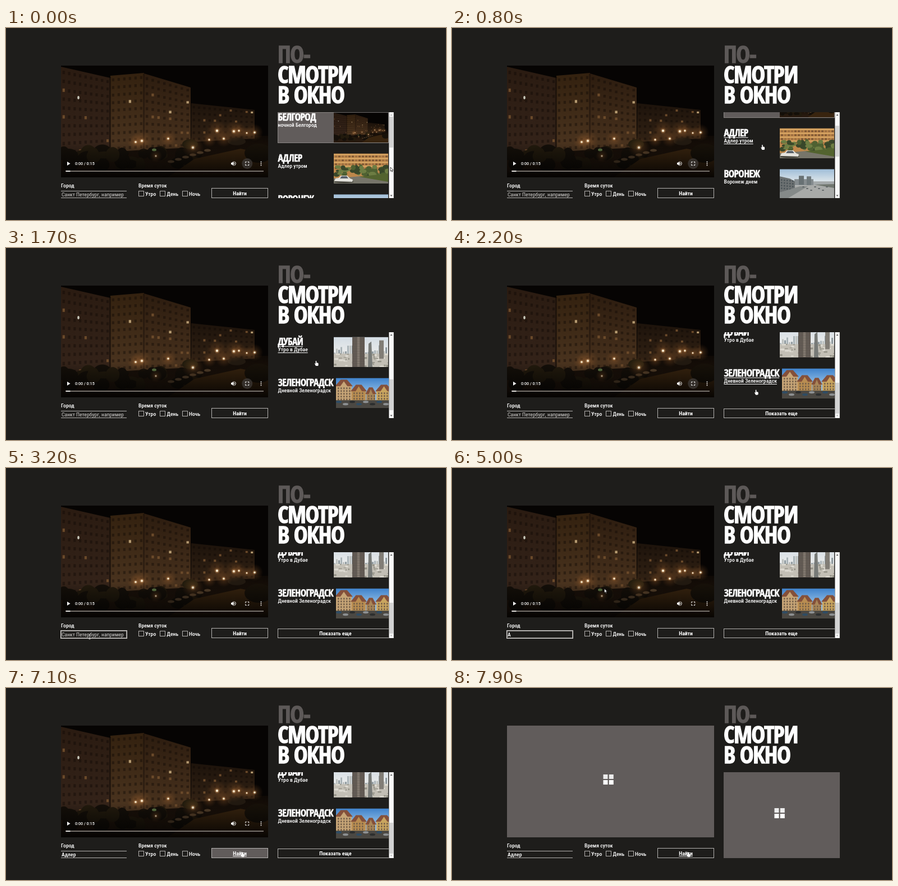
An HTML page with a canvas that plays this animation: 784x342 px, repeating every 8000 ms.

```html
<!DOCTYPE html>
<html lang="ru">
<head>
<meta charset="utf-8">
<title>Посмотри в окно</title>
<style>
html, body { margin: 0; width: 100%; height: 100%; overflow: hidden; background: #1e1d1b; }
canvas { display: block; width: 784px; height: 342px; }
</style>
</head>
<body>
<canvas id="stage"></canvas>
<script>
const W = 784, H = 342, LOOP = 8000, STEP = 100;
const BG = '#1e1d1b', GREY = '#615c5b', WHITE = '#fff', LINE = '#b4b2b0';
const canvas = document.getElementById('stage');
const ctx = canvas.getContext('2d');
const dpr = window.devicePixelRatio || 1;
canvas.width = W * dpr;
canvas.height = H * dpr;

// ---- type ----
const TIGHT = -.035, HEFT = .03; // tracking and extra weight of display type, in em
const face = (weight, stretch, family) => size => `${weight} ${stretch} ${size}px ${family}, sans-serif`;

function measure(font, sample) {
  ctx.font = font;
  return ctx.measureText(sample).width;
}

function narrowest(weight, families, sample) {
  return families
    .map(name => face(weight, 'extra-condensed', `"${name}"`))
    .sort((a, b) => measure(a(100), sample) - measure(b(100), sample))[0];
}

const sizeFor = (f, sample, width, max, tight = 0) =>
  Math.min(max, width / (measure(f(100), sample) / 100 + tight * sample.length));

const displayFace = narrowest(700, ['Noto Sans', 'Open Sans', 'Open Sans Condensed', 'Roboto Condensed'], 'СМОТРИ');
function display(sample, width, max) {
  const size = sizeFor(displayFace, sample, width, max, TIGHT);
  return { font: displayFace(size), tight: TIGHT * size, heft: HEFT * size };
}

const body = '"Roboto Condensed", Roboto';
const bodySize = sizeFor(face(400, 'condensed', body), 'Санкт Петербург, например', 111, 9.9);
const styles = {
  title: display('СМОТРИ', 132, 45),
  name: display('ЗЕЛЕНОГРАДСК', 103.5, 17.5),
  text: { font: face(400, 'condensed', body)(bodySize) },
  label: { font: face(500, 'condensed', body)(bodySize) },
  bold: { font: face(700, 'condensed', body)(bodySize) },
  time: { font: face(500, 'normal', 'Roboto')(7.2) }
};

function text(s, x, y, style, color = WHITE, { align = 'left', line = 0 } = {}) {
  const { font, tight = 0, heft = 0 } = styles[style];
  ctx.font = font;
  ctx.letterSpacing = `${tight}px`;
  ctx.textAlign = align;
  ctx.fillStyle = ctx.strokeStyle = color;
  ctx.fillText(s, x, y);
  if (heft) {
    ctx.lineWidth = heft;
    ctx.strokeText(s, x, y);
  }
  if (line) {
    const w = ctx.measureText(s).width;
    ctx.fillRect(align === 'center' ? x - w / 2 : x, y + line, w, 1);
  }
}

// ---- shapes ----
function rect(color, x, y, w, h) {
  ctx.fillStyle = color;
  ctx.fillRect(x, y, w, h);
}

function frame(color, x, y, w, h) {
  ctx.strokeStyle = color;
  ctx.lineWidth = 1;
  ctx.strokeRect(x + .5, y + .5, w - 1, h - 1);
}

function poly(color, ...p) {
  ctx.fillStyle = color;
  ctx.beginPath();
  for (let i = 0; i < p.length; i += 2) ctx.lineTo(p[i], p[i + 1]);
  ctx.closePath();
  ctx.fill();
}

function oval(color, x, y, rx, ry = rx) {
  ctx.fillStyle = color;
  ctx.beginPath();
  ctx.ellipse(x, y, rx, ry, 0, 0, 7);
  ctx.fill();
}

function fade(y0, y1, from, to) {
  const g = ctx.createLinearGradient(0, y0, 0, y1);
  g.addColorStop(0, from);
  g.addColorStop(1, to);
  return g;
}

function glow(x, y, r, color) {
  const g = ctx.createRadialGradient(x, y, 0, x, y, r);
  g.addColorStop(0, color);
  g.addColorStop(1, 'rgba(150,90,40,0)');
  rect(g, x - r, y - r, r * 2, r * 2);
}

// Draws a picture of its own size inside a clipped box.
function picture(draw, pw, ph, x, y, w, h) {
  ctx.save();
  ctx.beginPath();
  ctx.rect(x, y, w, h);
  ctx.clip();
  ctx.translate(x, y);
  ctx.scale(w / pw, h / ph);
  draw();
  ctx.restore();
}

function random(seed) {
  return () => (seed = (seed * 16807) % 2147483647) / 2147483647;
}

// ---- pictures ----
const mix = (a, b, k) => a + (b - a) * k;

function facade(x0, x1, top0, top1, bot0, bot1, dark, light, cols, rows, rnd) {
  poly(fade(Math.min(top0, top1), bot0, dark, light), x0, top0, x1, top1, x1, bot1, x0, bot0);
  const cw = (x1 - x0) / cols;
  for (let c = 0; c < cols; c++) {
    const k = (c + .5) / cols, top = mix(top0, top1, k), ch = (mix(bot0, bot1, k) - top) / rows;
    for (let r = 0; r < rows; r++) {
      const v = rnd();
      const tone = v > .985 ? '#b59a70' : v > .95 ? '#6b4a2a' : 'rgba(12,7,4,.38)';
      rect(tone, x0 + (c + .28) * cw, top + (r + .38) * ch, cw * .42, ch * .38);
    }
  }
}

function night() {
  const rnd = random(41);
  rect('#060403', 0, 0, 369, 199);
  rect(fade(125, 185, '#0e0905', '#27190e'), 0, 125, 369, 74);
  facade(0, 88, 2, 22, 162, 152, '#2a1b11', '#35241a', 9, 10, rnd);
  facade(88, 148, 18, 13, 154, 150, '#33210f', '#4c3520', 6, 10, rnd);
  facade(148, 231, 14, 39, 150, 146, '#2c1c0f', '#4a331e', 8, 10, rnd);
  facade(232, 345, 67, 79, 136, 130, '#1d130b', '#322214', 12, 6, rnd);
  rect('rgba(15,9,5,.5)', 86, 20, 3, 132);
  rect('rgba(15,9,5,.4)', 146, 14, 3, 136);
  for (let i = 0; i < 34; i++) {
    const x = rnd() * 240;
    oval(i % 3 ? '#140f09' : '#221a0d', x, 152 + rnd() * 26, 8 + rnd() * 12, 6 + rnd() * 9);
  }
  poly('#38240f', 238, 166, 320, 148, 369, 158, 369, 199, 190, 199);
  oval('#171109', 352, 156, 25, 17);
  oval('#211b0d', 230, 140, 14, 9);
  oval('#211910', 313, 135, 16, 7);
  for (let i = 0; i < 6; i++) oval('#54402b', 196 + i * 13, 171 - i * 4, 6, 2.4);
  const lamps = [[278, 116, 1], [308, 117, 1], [290, 130, .8], [264, 132, .7], [144, 134, 1],
    [133, 136, .8], [191, 130, .8], [235, 146, 1], [317, 116, .7], [331, 120, .6], [345, 119, .8], [169, 161, .6]];
  for (const [x, y, s] of lamps) {
    glow(x, y, 19 * s, 'rgba(190,120,60,.33)');
    glow(x, y, 5.5 * s, 'rgba(255,222,170,.95)');
    oval('#fff1d8', x, y, 2 * s);
  }
  oval('#c9cabb', 31, 57, 1.8, 3);
  oval('#5d7545', 166, 150, 4, 2.5);
}

function morning() {
  const rnd = random(7);
  rect('#bd874b', 0, 0, 97, 54);
  for (let y = 1; y < 28; y += 7) {
    rect('#d6a463', 0, y, 97, 2.5);
    for (let x = 2; x < 96; x += 6) rect(rnd() > .5 ? '#7d5634' : '#9b6d40', x, y + 3, 4, 3);
  }
  for (let i = 0; i < 60; i++) {
    oval(['#4f6132', '#6d7d43', '#39472a'][i % 3], rnd() * 97, 24 + rnd() * 18, 3 + rnd() * 4, 2 + rnd() * 3);
  }
  poly('#77756a', 0, 45, 48, 41, 97, 50, 97, 54, 0, 54);
  poly('#53632f', 45, 42, 97, 36, 97, 51);
  oval('#3b3a32', 18, 51, 17, 2);
  poly('#e4e2dc', 1, 50, 3, 45, 9, 44, 13, 40, 24, 40, 29, 45, 34, 47, 33, 51);
  poly('#59616a', 11, 45, 14, 41, 23, 41, 26, 45);
}

function day() {
  rect(fade(0, 26, '#9fbdd8', '#e6ebec'), 0, 0, 97, 54);
  rect('#858c8f', 26, 18, 34, 11);
  rect('#a4a9aa', 60, 22, 37, 8);
  rect('#687174', 34, 12, 9, 16);
  rect('#70797c', 48, 13, 8, 16);
  poly('#a8aaa8', 0, 30, 97, 28, 97, 54, 0, 54);
  poly('#6c7172', 0, 13, 18, 17, 27, 22, 27, 35, 0, 42);
  for (let y = 18; y < 38; y += 5) for (let x = 2; x < 25; x += 5) rect('#4a5357', x, y + x * .1, 2.5, 2.5);
  poly('#858a89', 0, 42, 36, 31, 50, 31, 12, 54, 0, 54);
  poly('#70766f', 62, 28, 97, 27, 97, 34);
  for (let i = 0; i < 7; i++) oval('#5a6062', 42 + i * 7, 32 + (i % 3) * 3, 2, 1);
}

function towers() {
  const rnd = random(19);
  rect(fade(0, 34, '#d3dce4', '#eeeeec'), 0, 0, 97, 54);
  for (let i = 0; i < 24; i++) {
    const h = 3 + rnd() * 14;
    rect(['#aab4b8', '#bcc0be', '#8f9a9f'][i % 3], i * 4, 31 - h, 3, h + 6);
  }
  rect('#c3bfb5', 0, 30, 97, 24);
  for (let i = 0; i < 60; i++) rect(i % 2 ? '#dedbd2' : '#939186', rnd() * 97, 29 + rnd() * 24, 2 + rnd() * 5, 1 + rnd() * 2.5);
  const tower = (x, w) => {
    rect('#655d56', x, 0, w, 54);
    rect('#8a8076', x + w * .4, 0, w * .2, 54);
    for (let y = 2; y < 54; y += 3) rect('#57504b', x, y, w, .8);
  };
  tower(33, 22);
  poly('#777a77', 62, 12, 67, 8, 69, 54, 61, 54);
  rect('#817d76', 81, 6, 8, 33);
}

function houses() {
  rect(fade(0, 28, '#3f82cb', '#93bfe6'), 0, 0, 97, 54);
  const house = (x, w, top, wall) => {
    rect(wall, x, top + 10, w, 45 - top - 10);
    poly('#84503a', x - 2, top + 12, x + w * .3, top, x + w * .7, top, x + w + 2, top + 12);
    poly(wall, x + w * .25, top + 13, x + w / 2, top + 3, x + w * .75, top + 13);
    for (let y = top + 14; y < 40; y += 5) for (let c = x + 3; c < x + w - 2; c += 5) rect('#76614a', c, y, 2.5, 3);
  };
  house(54, 16, 17, '#a98658');
  house(72, 27, 12, '#c9a55f');
  house(0, 28, 3, '#c7a577');
  house(28, 25, 12, '#b98d51');
  rect('#4b4843', 0, 40, 97, 14);
  for (let i = 0; i < 8; i++) oval(['#2f4c64', '#8d9092', '#2c2e2f'][i % 3], 5 + i * 12, 43 + (i % 2) * 4, 5, 2.2);
}

// ---- page ----
const LIST = { x: 484, y: 150, w: 198, h: 153, pitch: 72.9, full: 380.6 };
const MAX_SCROLL = LIST.full - LIST.h;
const items = [
  ['БЕЛГОРОД', 'ночной Белгород', night, 369, 199],
  ['АДЛЕР', 'Адлер утром', morning, 97, 54],
  ['ВОРОНЕЖ', 'Воронеж днем', day, 97, 54],
  ['ДУБАЙ', 'Утро в Дубае', towers, 97, 54],
  ['ЗЕЛЕНОГРАДСК', 'Дневной Зеленоградск', houses, 97, 54]
];

const FOCUS = 3100, PRESS = 7100, LOAD = 7200;
const scrollKeys = [[300, 0], [1000, 62.9], [1700, 210.6], [1900, MAX_SCROLL]];
const mouseKeys = [[0, 685, 248], [600, 560, 212], [1000, 546, 204], [1700, 552.5, 201], [2100, 557, 240],
  [2600, 480, 303], [3100, 149, 300], [3600, 149, 300], [4300, 271.5, 215], [6000, 271.5, 215],
  [6800, 419, 293], [6900, 420.5, 292]];
const typed = [[4300, 'А'], [5200, 'Ад'], [5400, 'Адл'], [5600, 'Адле'], [5800, 'Адлер']];

function at(keys, t) {
  const i = keys.findIndex(k => k[0] > t);
  if (i < 0) return keys[keys.length - 1].slice(1);
  if (i === 0) return keys[0].slice(1);
  const a = keys[i - 1], b = keys[i], k = (t - a[0]) / (b[0] - a[0]);
  return a.slice(1).map((v, n) => mix(v, b[n + 1], k));
}

const inside = ([px, py], x, y, w, h) => px >= x && px < x + w && py >= y && py < y + h;

function title() {
  text('ПО-', 484, 61.5, 'title', '#5d5958');
  text('СМОТРИ', 484, 97.5, 'title');
  text('В ОКНО', 484, 133.5, 'title');
}

function video(t) {
  picture(night, 369, 199, 98, 67, 369, 199);
  rect(fade(205, 266, 'rgba(0,0,0,0)', 'rgba(0,0,0,.85)'), 98, 205, 369, 61);
  poly(WHITE, 109, 238, 114.5, 241.5, 109, 245);
  text('0:00 / 0:15', 123, 244, 'time');
  if (t < FOCUS) oval('rgba(62,58,55,.75)', 429.7, 241.5, 9.5);

  poly(WHITE, 401, 239.8, 403, 239.8, 405.5, 237.3, 405.5, 245.7, 403, 243.2, 401, 243.2);
  ctx.strokeStyle = WHITE;
  ctx.lineWidth = 1;
  for (const r of [1.6, 3.7]) {
    ctx.beginPath();
    ctx.arc(405.5, 241.5, r, -1.2, 1.2);
    ctx.stroke();
  }
  for (const sx of [-1, 1]) for (const sy of [-1, 1]) {
    ctx.beginPath();
    ctx.moveTo(429.7 + sx * 3, 241.5 + sy);
    ctx.lineTo(429.7 + sx * 3, 241.5 + sy * 3);
    ctx.lineTo(429.7 + sx, 241.5 + sy * 3);
    ctx.stroke();
  }
  for (const dy of [-3, 0, 3]) oval(WHITE, 454.5, 241.5 + dy, .9);
  rect('#76716c', 106.5, 254, 352.5, 2);
  rect('#e6e3e0', 106.5, 254, 8, 2);
}

function list(scroll, mouse) {
  ctx.save();
  ctx.beginPath();
  ctx.rect(LIST.x, LIST.y, LIST.w, LIST.h);
  ctx.clip();
  items.forEach(([name, note, draw, pw, ph], i) => {
    const y = LIST.y + i * LIST.pitch - scroll;
    const hover = inside(mouse, LIST.x, y, LIST.w, 54);
    if (i === 0) {
      rect(GREY, LIST.x, y, LIST.w, 55);
      frame('#8b8785', LIST.x, y, LIST.w, 55);
    }
    picture(draw, pw, ph, i === 4 ? 588 : 584, y + .5, 97, 53.5);
    text(name, 484.5, y + 14.7, 'name', WHITE, { line: hover && 2 });
    text(note, 484.5, y + 26, 'label', WHITE, { line: hover && 2 });
  });
  const by = Math.floor(LIST.y + LIST.full - 17 - scroll + .1);
  frame(LINE, LIST.x, by, LIST.w + 1, 17);
  text('Показать еще', 587, by + 12, 'bold', WHITE, { align: 'center' });
  ctx.restore();

  rect('#f9f9f9', 682.4, 150, 8.4, 153);
  rect('#d3d3d3', 683, 158 + scroll / MAX_SCROLL * 82, 7, 55);
  poly(scroll > 0 ? '#505050' : '#b5b5b5', 684.5, 156, 686.5, 153.5, 688.5, 156);
  poly(scroll < MAX_SCROLL ? '#505050' : '#b5b5b5', 684.5, 297.5, 686.5, 300, 688.5, 297.5);
}

function form(t, mouse) {
  text('Город', 98, 284, 'label');
  text('Время суток', 236, 284, 'label');
  rect(LINE, 98, 290, 117, 1);
  rect(LINE, 98, 302, 117, 1);
  if (t >= FOCUS && t < PRESS) {
    frame('#d0cecc', 97, 289, 119, 15);
    frame('#8f8c89', 98, 290, 117, 13);
  }
  const value = typed.filter(k => k[0] <= t).pop();
  if (value) text(value[1], 99, 299.5, 'label');
  else text('Санкт Петербург, например', 99, 299.5, 'text', '#d0cecc');

  [['Утро', 236, 248], ['День', 274, 286.5], ['Ночь', 314, 326]].forEach(([s, bx, tx]) => {
    frame(LINE, bx, 290, 10, 10);
    text(s, tx, 298.5, 'label');
  });

  if (t >= PRESS && t < LOAD) rect(GREY, 366, 285, 101, 18);
  frame(LINE, 366, 285, 101, 18);
  text('Найти', 416.5, 297.5, 'bold', WHITE, { align: 'center', line: inside(mouse, 366, 285, 101, 18) && 1.5 });
}

function loader(t) {
  rect(GREY, 98, 67, 369, 199);
  rect(GREY, 484, 150, 207, 153);
  for (const [x, y] of [[269.5, 154], [574.5, 214]]) {
    rect('#ececec', x, y, 8, 8);
    rect(t >= 7900 ? '#ececec' : WHITE, x + 10.3, y, 8, 8);
    rect(WHITE, x, y + 10, 8, 8);
    rect(WHITE, x + 10.3, y + 10, 8, 8);
  }
}

function pointer([x, y], kind) {
  ctx.save();
  ctx.translate(x, y);
  ctx.lineWidth = .8;
  ctx.strokeStyle = '#222';
  if (kind === 'beam') {
    rect('#c9c7c5', -.4, -3, .8, 8);
    rect('#c9c7c5', -1.5, -3.5, 3, .8);
    rect('#c9c7c5', -1.5, 4.5, 3, .8);
  } else if (kind === 'hand') {
    ctx.beginPath();
    ctx.roundRect(-.8, 0, 1.6, 7, .8);
    ctx.roundRect(-1.1, 3.6, 5.2, 5.4, 1.5);
    ctx.fillStyle = WHITE;
    ctx.fill();
    poly(WHITE, -2.8, 4.8, -1.6, 4.6, -.4, 6, 2, 9, -.2, 9);
  } else {
    poly(WHITE, 0, 0, 0, 7.2, 1.7, 5.7, 2.8, 8.2, 3.9, 7.7, 2.8, 5.2, 5, 5.1);
    ctx.stroke();
  }
  ctx.restore();
}

function cursorKind(t, mouse, scroll) {
  if (inside(mouse, 98, 289, 117, 15)) return 'beam';
  if (inside(mouse, 366, 285, 101, 18)) return 'hand';
  if (!inside(mouse, LIST.x, LIST.y, LIST.w, LIST.h)) return 'arrow';
  const y = mouse[1] - LIST.y + scroll;
  return y % LIST.pitch < 54 || y > LIST.full - 17 ? 'hand' : 'arrow';
}

function draw(t) {
  const [scroll] = at(scrollKeys, t);
  const mouse = at(mouseKeys, t);
  ctx.setTransform(dpr, 0, 0, dpr, 0, 0);
  ctx.lineJoin = 'miter';
  ctx.miterLimit = 3;
  rect(BG, 0, 0, W, H);
  title();
  if (t < LOAD) {
    video(t);
    list(scroll, mouse);
  } else {
    loader(t);
  }
  form(t, mouse);
  pointer(mouse, cursorKind(t, mouse, scroll));
}

let shown = -1;
function tick() {
  const t = Math.floor(performance.now() % LOOP / STEP) * STEP;
  if (t !== shown) draw(shown = t);
  requestAnimationFrame(tick);
}
tick();
</script>
</body>
</html>
```
